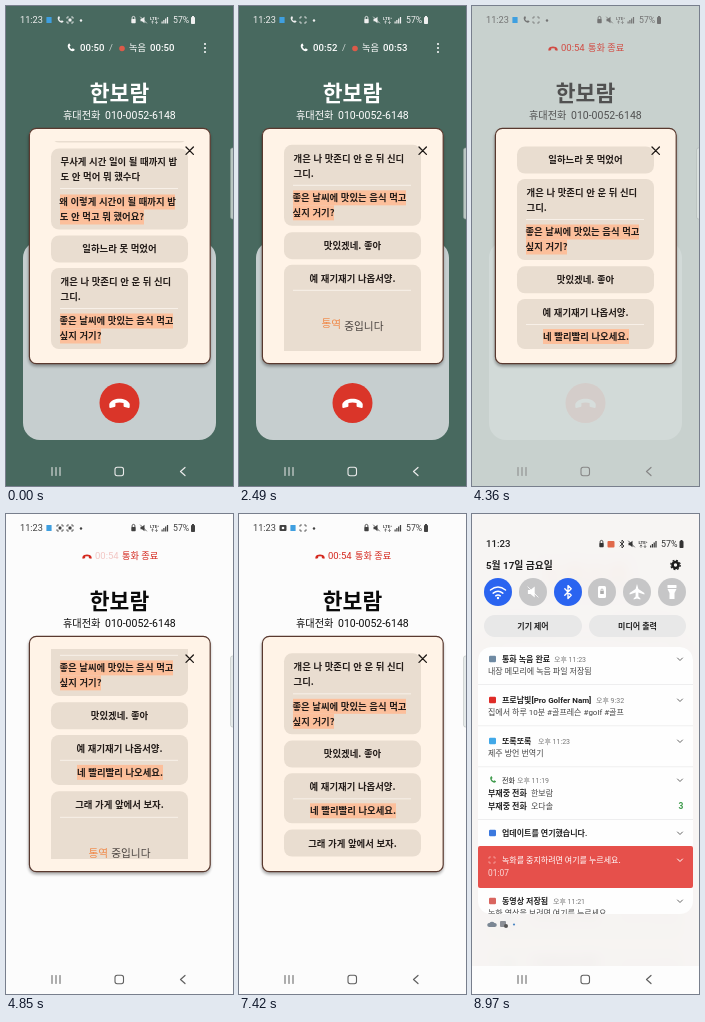
An HTML page for the animation above (9000 ms loop, 227 by 480 pixels).

```html
<!DOCTYPE html>
<html lang="ko">
<head>
<meta charset="utf-8">
<title>통화 통역</title>
<style>
html, body { margin: 0; width: 100%; height: 100%; overflow: hidden; background: #fff; }
svg { display: block; width: 100%; height: 100%; font-family: Roboto, "Noto Sans CJK KR", "Noto Sans CJK", sans-serif; }
#list { font-family: "Noto Sans CJK KR", "Noto Sans CJK", sans-serif; }
.heavy { stroke: currentColor; stroke-width: .5; }
text { white-space: pre; }
</style>
</head>
<body>
<svg id="stage" viewBox="0 0 227 480"></svg>
<script>
const LOOP = 9000;
const CALLER = '한보람', MISSED = '오다솔', APP = '또록또록', PHONE = '010-0052-6148';

// ---- drawing helpers ----
const text = (x, y, s, size = 8, weight = 400, fill = '#222', anchor = 'start', extra = '') =>
  `<text x="${x}" y="${(y + size * .36).toFixed(2)}" font-size="${size}" font-weight="${weight}" fill="${fill}" text-anchor="${anchor}" ${extra}>${s}</text>`;
const heavy = (x, y, s, size, fill, anchor) => text(x, y, s, size, 700, fill, anchor, `class="heavy" color="${fill}"`);
const rect = (x, y, w, h, r, fill, extra = '') =>
  `<rect x="${x}" y="${y}" width="${w}" height="${h}" rx="${r}" fill="${fill}" ${extra}/>`;
const circle = (x, y, r, fill, extra = '') => `<circle cx="${x}" cy="${y}" r="${r}" fill="${fill}" ${extra}/>`;
const line = (d, color = 'currentColor', w = 1) =>
  `<path d="${d}" fill="none" stroke="${color}" stroke-width="${w}" stroke-linecap="round" stroke-linejoin="round"/>`;
const group = (id, body) => `<g id="${id}">${body}</g>`;
const handset = (x, y, scale, color, turn = 0) =>
  `<path transform="translate(${x} ${y}) rotate(${turn}) scale(${scale})" fill="${color}" d="M-10 1C-7-6 7-6 10 1V4Q10 5 9 5L5 4Q4 4 4 3V0Q0-1-4 0V3Q-4 4-5 4L-9 5Q-10 5-10 4Z"/>`;

// ---- status bar ----
const corners = (x, y) =>
  line(`M${x - 3} ${y - 1.6}v-1.4h1.5M${x + 1.5} ${y - 3}h1.5v1.4M${x + 3} ${y + 1.6}v1.4h-1.5M${x - 1.5} ${y + 3}h-1.5v-1.4`, undefined, .8);
const bluetooth = (x, y, s = 1, color, w = .9) =>
  line(`M${x - 2 * s} ${y - 2 * s}l${4 * s} ${4 * s}l${-2 * s} ${2 * s}v${-8 * s}l${2 * s} ${2 * s}l${-4 * s} ${4 * s}`, color, w);
const muted = (x, y, color, s = 1) =>
  `<path transform="translate(${x} ${y}) scale(${s})" fill="${color}" d="M-3-1.2h1.5l2.5-2v6.4l-2.5-2h-1.5z"/>` +
  line(`M${x - 3 * s} ${y - 3 * s}l${6 * s} ${6 * s}`, color, .8);
const lock = (x, y) => rect(x - 2.2, y - 1, 4.4, 4.2, .7, 'currentColor') + line(`M${x - 1.4} ${y - 1}v-1.2a1.4 1.4 0 0 1 2.8 0v1.2`, undefined, .9);
const reception = (x, y) =>
  text(x, y - 1.8, 'LTE⁺', 4.4, 700, 'currentColor', 'middle') + line(`M${x - 2} ${y + 3.4}v-2.4m-1 1l1-1l1 1M${x + 2} ${y + 1}v2.4m-1-1l1 1l1-1`, undefined, .6) +
  [0, 1, 2, 3].map(i => rect(x + 7 + i * 1.8, y + 1.5 - i * 1.5, 1.2, 2 + i * 1.5, 0, 'currentColor')).join('');
const battery = (x, y) => rect(x - 2, y - 3, 4, 7, .8, 'currentColor') + rect(x - 1, y - 4, 2, 1, 0, 'currentColor');

const status = group('status',
  text(14, 14, '11:23', 9.2, 400, 'currentColor') +
  group('iconShot', rect(40.5, 11, 7, 6, 1, 'currentColor') + circle(44, 14, 1.3, '#fff')) +
  group('iconApp', rect(-2.6, -3, 5.2, 6, .3, '#3f9fe0')) +
  group('iconCall', handset(54, 14, .36, 'currentColor', -130)) +
  group('iconSaved', corners(54, 14) + rect(52.6, 12.6, 2.8, 2.8, .5, 'currentColor')) +
  corners(64, 14) + group('recDot', rect(62.5, 12.6, 3, 2.8, .5, 'currentColor')) +
  circle(75, 14.5, 1.2, 'currentColor') +
  lock(127.5, 14) + muted(137.5, 14, 'currentColor') + reception(148.5, 14) +
  text(167, 14, '57%', 8.7, 400, 'currentColor') + battery(187, 14));

// ---- call screen ----
const call =
  rect(0, 0, 227, 480, 0, '#48695f') +
  group('pad', rect(17, 235, 193, 199, 17, '#c6cecf') +
    circle(113.5, 397, 20, '#da3529') + handset(113.5, 397, 1.02, '#fff')) +
  group('paper', rect(0, 0, 227, 480, 0, '#fcfcfc')) +
  group('live', handset(64.5, 42, .43, '#fff', -130) +
    text(74, 42, '', 9.6, 500, '#fff', 'start', 'id="callTime"') + text(105, 42, '/', 9.4, 400, '#cdd6d3', 'middle') +
    circle(116, 42.5, 2.8, '#dd5a49') + text(123, 42, '녹음', 9.2, 500, '#fff') +
    text(144, 42, '', 9.6, 500, '#fff', 'start', 'id="recTime"') +
    [38, 42, 46].map(y => circle(199, y, 1, '#fff')).join('')) +
  group('ended', handset(81, 42.5, .46, '#d4281e') +
    text(89, 42, '00:54', 9.5, 400, '#d4281e', 'start', 'id="endTime"') + text(116, 42, '통화 종료', 9.2, 500, '#d4281e')) +
  group('person', text(113.5, 87, CALLER, 21.5, 700, 'currentColor', 'middle') +
    text(57, 109.5, '휴대전화', 10.2, 500, 'currentColor') + text(99, 109.5, PHONE, 10.5, 400, 'currentColor')) +
  rect(224.5, 142, 5, 71, 2, '#dfe5e4', 'stroke="#a8b0ae" stroke-width=".6" opacity=".75"');

// ---- app screen ----
const statue = circle(36, 401, 14, '#fff') + rect(31, 391, 10, 6, 2.4, '#3f6480') + rect(32, 396, 8, 8, 3, '#8fb3c8') +
  rect(29.5, 402, 13, 10, 3, '#4f7d9c');
const palm = circle(36, 454, 14, '#fff') + rect(35, 450, 2.4, 14, 1, '#a5703f') + circle(36, 457, 4, '#f1b45a') +
  line('M36 450q-5-7-9-1M36 450q5-7 9-1M36 450q-4-3-6 5M36 450q4-3 6 5M36 450v-5', '#3c8a45', 2.4);
const entry = (y, name, avatar) =>
  rect(15, y + 1.5, 196, 43, 5, '#cdbdad', 'opacity=".7"') + rect(15, y, 196, 43, 5, '#efe0d2') + avatar +
  heavy(60, y + 15, name + '님과의 통화', 8.7, '#2d2420') +
  text(60, y + 27, PHONE, 9.6, 500, '#857b75') + text(153, y + 21, '05-17 22:06', 9.6, 500, '#675d57');
const app = group('app',
  rect(0, 0, 227, 480, 0, '#fff5ec') + rect(0, 128, 227, 352, 0, '#fdeedf') +
  heavy(113.5, 61, APP, 24, '#ef7d35', 'middle') +
  text(113.5, 76, '<tspan fill="#ef7f3d">제</tspan>주도 사투리를 <tspan fill="#ef7f3d">잘</tspan> 이해하자!', 7.1, 700, '#3b302a', 'middle') +
  heavy(32, 113, '전화 통역', 12.7, '#17110e') + heavy(145, 113, '파일 통역', 12.7, '#866a5e') +
  rect(0, 127.5, 113, 1.5, 0, '#ee9340') +
  circle(191, 175, 20, 'none', 'stroke="#f29a3f" stroke-width="2"') +
  rect(18, 256, 191, 66, 6, '#efe0d2') +
  rect(25, 353, 9, 10, 1.5, 'none', 'stroke="#7b6a60" stroke-width="1.3"') +
  heavy(40, 358, '전화 통역 기록', 11.5, '#5a4a41') +
  circle(188, 358, 4.3, 'none', 'stroke="#7b6a60" stroke-width="1.2"') +
  entry(380, CALLER, statue) + entry(433, MISSED, palm));

// ---- translation pop-up ----
const INK = '#231c19';
const card = (y, h, id = '') => rect(45, y, 137, h, 8, '#e9ddd0', id && `id="${id}"`);
const rule = y => rect(54, y, 118, 1, 0, '#f8f0e8');
const said = (y, s, mid = false) => text(mid ? 113.5 : 54.5, y, s, 9.4, 700, INK, mid ? 'middle' : 'start');
const marked = (x, y, w, s) => rect(x, y - 7.5, w, 15, 0, '#fcbf9b') + text(x + w / 2, y, s, 9.4, 700, INK, 'middle');
const waiting = (id, y) => group(id, rule(y - 36) +
  text(113.5, y, [...'통역 중입니다'].map((c, i) => `<tspan fill="${i < 2 ? '#f08a4b' : '#4a4440'}">${c}</tspan>`).join(''), 10.7, 400, INK, 'middle'));
const popup =
  rect(22.5, 124, 182, 236.5, 8, '#000', 'opacity=".32" filter="url(#soft)"') +
  rect(23.4, 122.3, 180.8, 235.4, 7, '#fff3e7', 'stroke="#59392f" stroke-width="1.2"') +
  `<g clip-path="url(#view)">` + group('list',
    card(100, 36.5) +
    card(142.5, 81) + said(156, '무사게 시간 일이 될 때까지 밥') + said(171, '도 안 먹어 뭐 했수다') + rule(182) +
    marked(54, 196, 115, '왜 이렇게 시간이 될 때까지 밥') + marked(54, 211, 84, '도 안 먹고 뭐 했어요?') +
    card(229.5, 27) + said(243, '일하느라 못 먹었어', true) +
    card(262, 81) + said(275.5, '개은 나 맛존디 안 운 뒤 신디') + said(290.5, '그디.') + rule(302) +
    marked(54, 315, 113, '좋은 날씨에 맛있는 음식 먹고') + marked(54, 330, 41, '싶지 거기?') +
    card(349.3, 27) + said(362.7, '맛있겠네. 좋아', true) +
    card(382, 103, 'card5') + said(395.5, '예 재기재기 나옵서양.', true) + waiting('wait5', 443) +
    group('answer5', rule(407) + marked(71, 419.5, 86, '네 빨리빨리 나오세요.')) +
    group('last', card(438.3, 103, 'card6') + said(452, '그래 가게 앞에서 보자.', true) + waiting('wait6', 500))) +
  `</g>` + line('M180 141l7.4 7.4m0-7.4l-7.4 7.4', '#1d1815', 1.3);

// ---- notification shade ----
const chevron = (y, color = '#666') => line(`M205.5 ${y - 1}l2.5 2.5l2.5-2.5`, color, 1);
const notice = (y, color, title, timeX = 0, time = '', body = '') =>
  rect(17, y - 3.3, 7, 6.6, 1.2, color) + text(30, y, title, 8, 700, '#222') + text(timeX, y, time, 7, 400, '#777') +
  chevron(y) + text(16, y + 12.5, body, 8, 400, '#444');
const toggleArt = [
  line('M18.5 76q7.5-6 15 0M21.2 79.2q4.8-3.8 9.6 0M23.7 81.8q2.3-1.6 4.6 0', '#fff', 1.5) + circle(26, 84, 1.2, '#fff'),
  muted(61, 78, '#fff', 1.7),
  bluetooth(96, 78, 1.6, '#fff', 1.4),
  rect(126, 72, 8, 12, 1.5, '#fff') + rect(128.2, 77, 3.6, 3, .5, '#aaa') + line('M129 77v-1a1 1 0 0 1 2 0v1', '#aaa', .8),
  `<path fill="#fff" d="M165 70l1.4 5l6 4v1.6l-6-2v4l2 1.8v1l-3.4-.8l-3.4.8v-1l2-1.8v-4l-6 2v-1.6l6-4z"/>`,
  rect(195.5, 71, 9, 3, .6, '#fff') + `<path fill="#fff" d="M195.5 75h9l-2 4v6h-5v-6z"/>`
].map((art, i) => circle([26, 61, 96, 130, 165, 200][i], 78, 14, i % 2 || i > 2 ? '#c6c6c7' : '#2a64f0') + art).join('');

const shade = group('veil', rect(0, 0, 227, 480, 0, '#f7f5f4')) + group('shade',
  text(14, 30, '11:23', 9.6, 500, '#222') +
  `<g color="#333">${lock(129.5, 30)}${rect(135.5, 27, 7, 6.5, 1, '#e0694a')}${bluetooth(150, 30)}${muted(159.5, 30, '#333')}${reception(171, 30)}${text(189, 30, '57%', 8.9, 400, '#333')}${battery(209.5, 30)}</g>` +
  group('panel',
    text(14, 51, '5월 17일 금요일', 9.8, 700, '#222') +
    circle(203.5, 51, 3, 'none', 'stroke="#1c1c1c" stroke-width="2.6"') +
    circle(203.5, 51, 4.7, 'none', 'stroke="#1c1c1c" stroke-width="1.3" stroke-dasharray="1.85"') +
    toggleArt +
    rect(12, 101, 98, 22, 11, '#e8e8e8') + text(61, 112, '기기 제어', 8, 700, '#222', 'middle') +
    rect(117, 101, 97, 22, 11, '#e8e8e8') + text(165.5, 112, '미디어 출력', 8, 700, '#222', 'middle') +
    `<g clip-path="url(#tray)">` + rect(6, 133, 215, 280, 13, '#fefefe') +
    [170, 211.5, 252.5, 305].map(y => rect(6, y, 215, .7, 0, '#e9e9ea')).join('') +
    notice(145, '#6f8aa3', '통화 녹음 완료', 82, '오후 11:23', '내장 메모리에 녹음 파일 저장됨') +
    notice(186, '#df2b27', '프로남빛[Pro Golfer Nam]', 124, '오후 9:32', '집에서 하루 10분 #골프레슨 #golf #골프') +
    notice(227, '#41a8e8', APP, 66, '오후 11:23', '제주 방언 번역기') +
    notice(266, '#fefefe', '<tspan font-weight="400" font-size="7">전화</tspan>', 45, '오후 11:19') + handset(20.5, 266, .36, '#3f9a4c', -130) +
    [[279, CALLER], [292, MISSED]].map(([y, who]) =>
      text(16, y, '부재중 전화', 8, 700) + text(59, y, who, 8, 400, '#444')).join('') +
    text(209, 292, '3', 8.5, 700, '#3c9a4a', 'middle') +
    notice(319, '#3b78de', '업데이트를 연기했습니다.') +
    notice(387, '#d9655f', '동영상 저장됨', 81, '오후 11:21', '녹화 영상을 보려면 여기를 누르세요.') +
    rect(6, 332, 215, 42, 2, '#e6504b') +
    `<g color="#f6aaa6">${corners(20, 346)}</g>` +
    text(30, 346, '녹화를 중지하려면 여기를 누르세요.', 8, 500, '#fff') + text(16, 359, '01:07', 8.4, 400, '#fbdad8') +
    chevron(346, '#fff') + `</g>` +
    `<path fill="#7b8794" d="M17 413a2 2 0 0 1 .5-4a3 3 0 0 1 5 0a2 2 0 0 1 .5 4z"/>` +
    rect(28, 407, 6, 6, 1, '#8b8f96') + circle(34, 412, 2, '#555') + circle(42, 410.5, 1.1, '#4c87c4')));

const nav = group('navBack', rect(0, 452, 227, 28, 0, '#fdfdfd')) + group('nav',
  line('M46 461.5v8M50 461.5v8M54 461.5v8') + rect(109, 461.3, 8.5, 8.5, 2.2, 'none', 'stroke="currentColor" stroke-width="1.1"') +
  line('M179 461.5l-4.5 4l4.5 4', undefined, 1.2));

document.getElementById('stage').innerHTML =
  `<defs><clipPath id="view"><rect x="44" y="135" width="139" height="210"/></clipPath>
   <clipPath id="tray"><rect x="6" y="133" width="215" height="267" rx="13"/></clipPath>
   <filter id="soft"><feGaussianBlur stdDeviation="1.8"/></filter></defs>` +
  group('scene', call + app + status + popup) + shade + nav;

// ---- motion ----
const el = {};
document.querySelectorAll('[id]').forEach(n => el[n.id] = n);
const clamp = v => Math.max(0, Math.min(1, v));
const smooth = v => v * v * (3 - 2 * v);
const ramp = (t, from, to) => smooth(clamp((t - from) / (to - from)));
const track = (t, keys) => {
  const i = keys.findIndex(k => t < k[0]);
  if (i < 0) return keys[keys.length - 1][1];
  if (i === 0) return keys[0][1];
  const [a, b] = [keys[i - 1], keys[i]];
  return a[1] + (b[1] - a[1]) * (t - a[0]) / (b[0] - a[0]);
};
const SCROLL = [[910, 0], [1500, 33], [1580, 37], [1900, 68], [2500, 124], [2900, 142], [3700, 142], [3800, 105], [3950, 89],
  [4400, 89], [4620, 122], [4850, 161], [5060, 187], [5280, 199], [6240, 199], [6300, 150], [6380, 122.7]];
const DIM = [[4800, 5430], [5940, 6440], [6940, 7420]];

const fade = (id, v) => el[id].setAttribute('opacity', v);
const show = (id, on) => { el[id].style.display = on ? '' : 'none'; };
const mix = (a, b, p) => { const v = Math.round(a + (b - a) * p); return `rgb(${v},${v},${v})`; };
const clock = (t, first) => '00:' + Math.min(54, 50 + Math.max(0, Math.floor((t - first) / 1000) + 1));

function wave(id, t) {
  const c = (t - 5180 + 4 * 1440) % 1440;
  let last = 0;
  el[id].querySelectorAll('tspan').forEach((s, i) => {
    const d = Math.abs(c - 150 - i * 120) / 200;
    const y = d < 1 ? -3 * Math.cos(d * Math.PI / 2) ** 2 : 0;
    s.setAttribute('dy', (y - last).toFixed(2));
    last = y;
  });
}

function draw(t) {
  const light = ramp(t, 4000, 4560);
  fade('paper', light);
  fade('pad', 1 - light);
  fade('live', 1 - ramp(t, 4000, 4250));
  fade('ended', ramp(t, 4150, 4450));
  fade('endTime', DIM.some(([a, b]) => t >= a && t < b) ? .25 : 1);
  el.callTime.textContent = clock(t, 710);
  el.recTime.textContent = clock(t, 450);
  el.person.style.color = mix(255, 10, light);
  el.status.style.color = mix(240, 65, light);
  el.nav.style.color = mix(235, 95, light);

  show('iconCall', t < 4500);
  show('iconSaved', t >= 4500 && t < 5550);
  show('iconShot', t >= 5550);
  el.iconApp.setAttribute('transform', `translate(${t < 5550 ? 43 : 54} 14)`);
  show('recDot', Math.floor((t + 290) / 500) % 2 === 0);

  el.list.setAttribute('transform', `translate(0 ${-track(t, SCROLL).toFixed(2)})`);
  const done5 = t >= 3700, done6 = t >= 6240;
  el.card5.setAttribute('height', done5 ? 50 : 103);
  el.card6.setAttribute('height', done6 ? 27 : 103);
  show('wait5', !done5);
  show('answer5', done5);
  show('last', t >= 4380);
  show('wait6', !done6);
  wave('wait5', t);
  wave('wait6', t);

  const appIn = ramp(t, 7700, 7950);
  fade('app', appIn);
  fade('navBack', appIn);
  fade('status', 1 - ramp(t, 8080, 8280));
  const blur = track(t, [[8080, 0], [8330, .8], [8650, 6]]);
  el.scene.style.filter = blur ? `blur(${blur}px)` : 'none';
  fade('veil', track(t, [[8080, 0], [8330, .06], [8620, .96]]));
  fade('shade', ramp(t, 8360, 8620));
  el.panel.setAttribute('transform', `translate(0 ${-42 * (1 - ramp(t, 8360, 8930))})`);
}

const start = performance.now();
function tick() {
  draw((performance.now() - start) % LOOP);
  requestAnimationFrame(tick);
}
tick();
</script>
</body>
</html>
```
